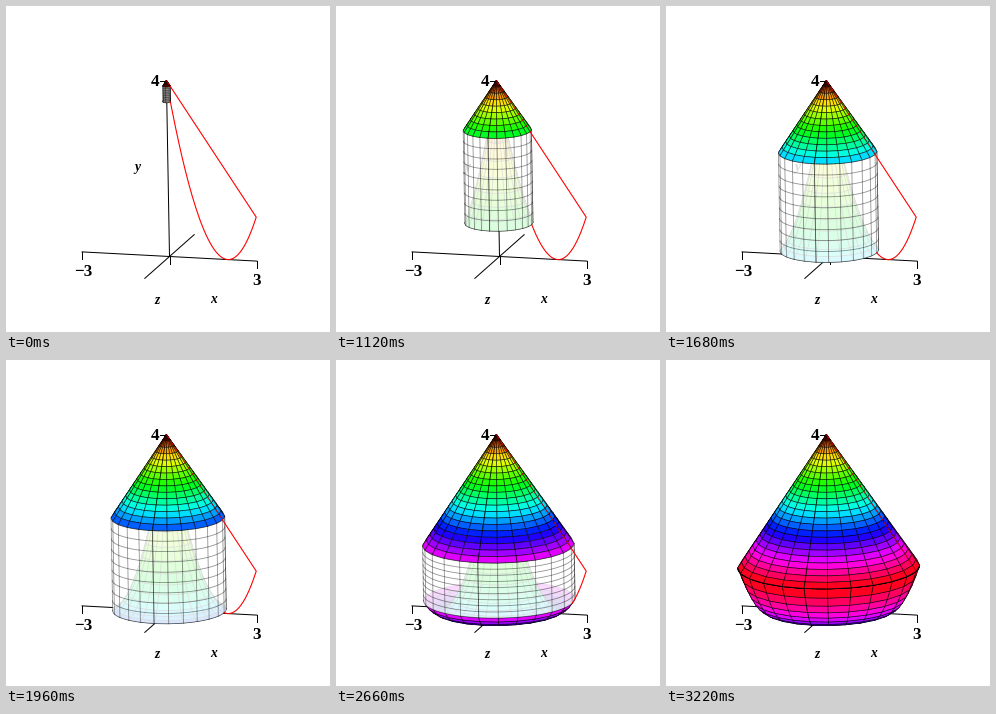
A matplotlib script for the animation above (3360 ms loop, 324 px wide and 326 px high).

```python
import colorsys

import matplotlib.pyplot as plt
import numpy as np
from matplotlib.animation import FuncAnimation
from matplotlib.collections import LineCollection, PolyCollection
from matplotlib.patches import Polygon

W, H, DPI = 324, 326, 64
PX = 72 / DPI                      # points per pixel
STEPS, INTERVAL = 24, 140
R_MAX, SECTORS, WALL_ROWS = 3.0, 24, 9

# Oblique parallel view with a slight roll
ORIGIN = (163.5, 250.5)
SCALE, Y_SCALE = 30.3, 44.0
SIN_EL, COS_EL = 0.245, 0.97
ROLL = 0.0175
TURN = np.radians(16)
Z_DIR, X_DIR = -TURN, np.pi / 2 - TURN   # angles measured from the viewer


def project(r, t, y):
    px = SCALE * r * np.sin(t)
    py = SCALE * SIN_EL * r * np.cos(t) - Y_SCALE * y
    return np.stack(np.broadcast_arrays(ORIGIN[0] + px + ROLL * py,
                                        ORIGIN[1] + py - ROLL * px), axis=-1)


def cone(r):
    return 4 - r


def bowl(r):
    return (r - 2) ** 2


def hue(h):
    return colorsys.hsv_to_rgb(h % 1, 1, 1)


def surface(height, rings):
    """Quads of a surface of revolution, sorted from back to front."""
    r = np.linspace(0, R_MAX, STEPS + 1)[:rings + 1]
    t = Z_DIR + np.linspace(0, 2 * np.pi, SECTORS + 1)
    rr, tt = np.meshgrid(r, t, indexing="ij")
    pts = project(rr, tt, height(rr))
    quads = np.stack([pts[:-1, :-1], pts[1:, :-1], pts[1:, 1:], pts[:-1, 1:]],
                     axis=2).reshape(-1, 4, 2)
    rm, tm = np.meshgrid((r[1:] + r[:-1]) / 2, (t[1:] + t[:-1]) / 2,
                         indexing="ij")
    depth = COS_EL * rm * np.cos(tm) + 1.5 * SIN_EL * height(rm)
    order = np.argsort(depth.ravel(), kind="stable")
    colors = np.array([hue(x / R_MAX) for x in rm.ravel()])
    return quads[order], colors[order]


fig = plt.figure(figsize=(W / DPI, H / DPI), dpi=DPI, facecolor="white")
ax = fig.add_axes([0, 0, 1, 1])
ax.set_xlim(0, W)
ax.set_ylim(H, 0)
ax.axis("off")


def stroke(points, color="black", width=1.0, **kw):
    p = np.asarray(points, float)
    return ax.plot(p[:, 0], p[:, 1], color=color, lw=width * PX, **kw)[0]


def label(x, y, text, size, **kw):
    ax.text(x, y, text, fontsize=size * PX, family="Liberation Serif",
            ha="center", va="baseline", **kw)


# Axes, ticks and labels
span = np.array([-3.0, 3.0])
x_ends = project(span, X_DIR, 0)
top = project(0, 0, 4)
stroke(x_ends, zorder=1)
stroke(project(span, Z_DIR, 0), zorder=1)
stroke([ORIGIN, top], zorder=1)
stroke([top, top - (6, 0)], zorder=1)
for base in (*x_ends, np.array(ORIGIN)):
    stroke([base, base + (0, 7)], zorder=1)
label(149, 79.5, "4", 17, weight="bold")
label(77, 270, "\u22123", 17, weight="bold")
label(251, 279, "3", 17, weight="bold")
for name, x, y in (("y", 131.5, 165.5), ("z", 151, 298), ("x", 208, 297)):
    label(x, y, name, 13.5, style="italic", weight="bold")

# Solid, back to front
mesh = dict(edgecolors=(0, 0, 0, 0.65), linewidths=0.75 * PX)
bowl_faces = PolyCollection([], zorder=2, **mesh)
wall = Polygon([(0, 0), (1, 0), (1, 1)], facecolor=(1, 1, 1, 0.86),
               edgecolor="none", zorder=3)
wall_lines = LineCollection([], colors=[(0, 0, 0, 0.42)],
                            linewidths=0.85 * PX, zorder=4)
cone_faces = PolyCollection([], zorder=5, **mesh)
for item in (bowl_faces, wall_lines, cone_faces):
    ax.add_collection(item, autolim=False)
ax.add_patch(wall)
seam = stroke([(0, 0)], width=0.9, alpha=0.4, zorder=6)
inner_edge = stroke([(0, 0)], "red", 1.0, alpha=0.75, zorder=6,
                    dashes=(5, 2.5))
outline = stroke([(0, 0)], "red", 1.1, zorder=7)


def draw(i):
    rings = i + 1
    r = R_MAX * rings / STEPS
    hi, lo = cone(r), bowl(r)

    for faces, height in ((bowl_faces, bowl), (cone_faces, cone)):
        quads, colors = surface(height, rings)
        faces.set_verts(quads)
        faces.set_facecolor(colors)

    # Front half of the cylindrical shell
    arc = np.linspace(-np.pi / 2, np.pi / 2, 61)
    wall.set_xy(np.vstack([project(r, arc, hi), project(r, arc[::-1], lo)]))
    grid = Z_DIR + np.arange(-12, 13) * 2 * np.pi / SECTORS
    front = np.r_[arc[0], grid[np.abs(grid) < np.pi / 2], arc[-1]]
    levels = np.linspace(lo, hi, WALL_ROWS + 1)
    wall_lines.set_segments(
        [project(r, t, np.array([lo, hi])) for t in front]
        + [project(r, arc, y) for y in levels])

    under = np.linspace(r, min(r, 2), 12)
    seam.set_data(*np.vstack([project(0, Z_DIR, 4)[None],
                              project(r, Z_DIR, np.array([hi, lo])),
                              project(under, Z_DIR, bowl(under))]).T)

    # Boundary of the plane region: on the cone, then outside the solid
    on = np.array([0, r])
    inner_edge.set_data(*project(on, X_DIR, cone(on)).T)
    out = np.linspace(R_MAX, r, 80)
    outline.set_data(*np.vstack([project(out[::-1], X_DIR, cone(out[::-1])),
                                 project(out, X_DIR, bowl(out))]).T)
    return bowl_faces, wall, wall_lines, cone_faces, seam, inner_edge, outline


anim = FuncAnimation(fig, draw, frames=STEPS, interval=INTERVAL,
                     repeat=True, repeat_delay=0, blit=False)
plt.show()
```
